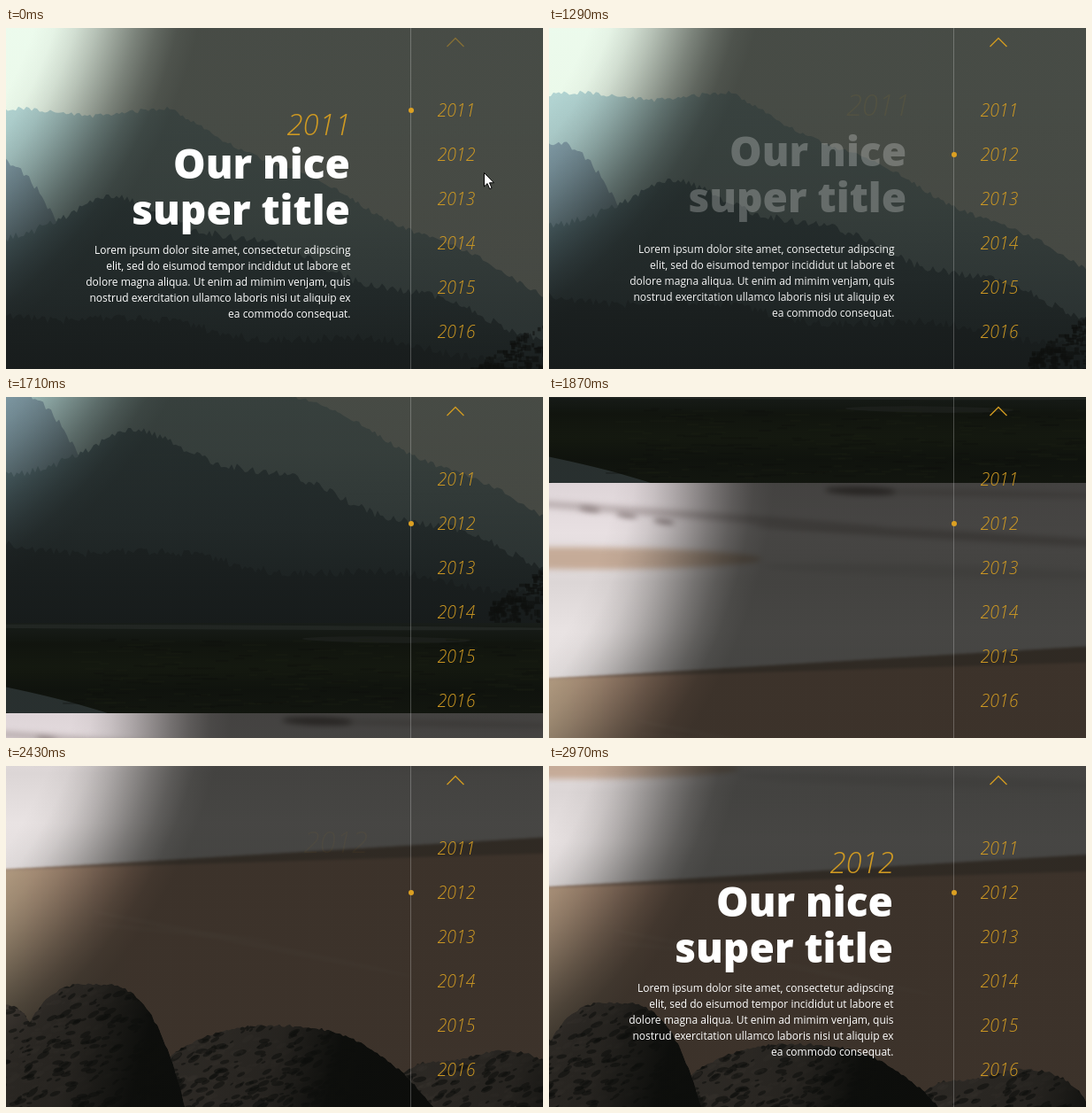
These frames come from a looping animation (607 px wide and 385 px high, 3220 ms). An HTML page with a canvas:

```html
<!DOCTYPE html>
<html lang="en">
<head>
<meta charset="utf-8">
<title>Timeline slider</title>
<style>
html, body { margin: 0; width: 100%; height: 100%; overflow: hidden; background: #101412; }
canvas { display: block; }
</style>
</head>
<body>
<canvas id="stage" width="607" height="385"></canvas>
<script>
const W = 607, H = 385, LOOP = 3220;
const HOLD = 142.5;                     // the picture changes about seven times a second
const IMG_H = 593, PAD = 60, TOP = 104; // each slide is taller and wider than the stage
const LEFT = -PAD, RIGHT = W + PAD;
const GOLD = '#d09a22';
const ctx = document.getElementById('stage').getContext('2d');

const BODY = [
  'Lorem ipsum dolor site amet, consectetur adipscing',
  'elit, sed do eisumod tempor incididut ut labore et',
  'dolore magna aliqua. Ut enim ad mimim venjam, quis',
  'nostrud exercitation ullamco laboris nisi ut aliquip ex',
  'ea commodo consequat.'
];

function seeded(seed) {
  return () => {
    seed = (seed * 1664525 + 1013904223) >>> 0;
    return seed / 4294967296;
  };
}

// Cubic bezier (.25, .1, .25, 1)
function ease(u) {
  if (u <= 0) return 0;
  if (u >= 1) return 1;
  let lo = 0, hi = 1, s = 0.5;
  for (let i = 0; i < 24; i++) {
    s = (lo + hi) / 2;
    if (0.75 * s * (1 - s) + s * s * s < u) lo = s; else hi = s;
  }
  return 0.3 * s * (1 - s) * (1 - s) + 3 * s * s * (1 - s) + s * s * s;
}
const tween = (t, start, length) => ease((t - start) / length);

/* ---------- Scenery ---------- */

function blend(grad, colors) {
  colors.forEach((c, i) => grad.addColorStop(i / (colors.length - 1), c));
  return grad;
}
const vertical = (g, y0, y1, ...colors) => blend(g.createLinearGradient(0, y0, 0, y1), colors);
const across = (g, x0, x1, ...colors) => blend(g.createLinearGradient(x0, 0, x1, 0), colors);

// Dark veil that clears towards the upper left.
function veil(g) {
  const inner = 410, outer = 590, alphas = [];
  for (let u = 0; u <= 1; u += 0.125) alphas.push(0.75 * u * u * (3 - 2 * u));
  g.fillStyle = blend(g.createRadialGradient(-334, -43, inner, -334, -43, outer),
    alphas.map(a => `rgba(16,17,14,${a})`));
  g.fillRect(LEFT, 0, RIGHT - LEFT, IMG_H);
}

function makeSlide(paint) {
  const c = document.createElement('canvas');
  c.width = RIGHT - LEFT;
  c.height = IMG_H;
  const g = c.getContext('2d');
  g.translate(PAD, 0);
  paint(g);
  veil(g);
  return c;
}

// Area below a rough line; line(x) is measured in the resting view.
function below(line, rough, seed) {
  const rnd = seeded(seed), path = new Path2D();
  path.moveTo(LEFT, IMG_H);
  for (let x = LEFT; x <= RIGHT; x += 3) path.lineTo(x, TOP + line(x) + (rnd() - 0.5) * rough);
  path.lineTo(RIGHT, IMG_H);
  path.closePath();
  return path;
}

function fill(g, path, style) {
  g.fillStyle = style;
  g.fill(path);
}

// Slanted streak with pointed ends.
function streak(g, style, x, y, length, drop, thick) {
  g.fillStyle = style;
  g.beginPath();
  g.ellipse(x, y, length / 2, thick / 2, Math.atan2(drop, length), 0, Math.PI * 2);
  g.fill();
}

const hills = makeSlide(g => {
  const rnd = seeded(5);
  g.fillStyle = vertical(g, 0, 380, '#edfcef', '#ebf9ea', '#e6eee0');
  g.fillRect(LEFT, 0, RIGHT - LEFT, IMG_H);

  const far = below(x => 74 + 0.48 * Math.max(0, x - 210) + 4 * Math.sin(x / 27 - 3), 5, 11);
  const spur = below(x => 126 + 0.014 * (x - 10) ** 2, 8, 23);
  const near = below(x => 172 + 0.32 * Math.abs(x - 150) + 6 * Math.sin(x / 30), 9, 37);
  const front = below(x => 296 + 0.09 * x + 6 * Math.sin(x / 40), 10, 51);
  fill(g, far, vertical(g, 174, 420, '#b2d4d2', '#a6c4c2', '#7f9aa0'));
  fill(g, spur, vertical(g, 230, 400, '#829da8', '#6f8992'));
  fill(g, near, vertical(g, 275, 489, '#64838a', '#566f78', '#35464e'));
  fill(g, front, 'rgba(36,48,56,.45)');

  // Bush in the right corner
  g.fillStyle = 'rgba(8,10,12,.6)';
  for (let i = 0; i < 230; i++) {
    const u = rnd();
    g.fillRect(545 + u * 110, TOP + H - rnd() * (20 + 75 * u), 2 + rnd() * 6, 2 + rnd() * 5);
  }

  // Meadow and stream below the trees
  g.fillStyle = vertical(g, 489, IMG_H, '#33433f', '#141f10', '#202e14', '#0e180c', '#182312');
  g.fillRect(LEFT, 491, RIGHT - LEFT, IMG_H);
  streak(g, '#55645f', 250, 496, 800, 4, 5);
  streak(g, '#3c4640', 430, 510, 190, 2, 7);
  streak(g, '#718b91', 10, 580, 280, 60, 28);
  for (let i = 0; i < 260; i++) {
    g.fillStyle = i % 2 ? 'rgba(60,76,32,.25)' : 'rgba(0,4,0,.3)';
    g.fillRect(60 + rnd() * 590, 508 + rnd() * 78, 8 + rnd() * 22, 2);
  }
});

// Boulder lit from the upper left; flecks make it rough.
function boulder(g, line, x0, x1, y0, seed) {
  const rnd = seeded(seed), span = x1 - x0;
  g.save();
  g.clip(below(line, 3, seed));
  const light = g.createLinearGradient(x0, y0, x0 + span * 0.95, y0 + span * 0.25);
  fill(g, below(line, 3, seed), blend(light, ['#82726a', '#7c6c64', '#665953', '#050606', '#020303']));
  for (let i = 0; i < 750; i++) {
    const u = rnd(), v = rnd(), s = 2 + rnd() * 6;
    const dark = rnd() < 0.45 + 0.3 * v;
    g.fillStyle = dark ? 'rgba(3,4,4,.55)' : `rgba(185,162,150,${0.4 * Math.max(0, 0.7 - u) * (1.2 - v)})`;
    g.beginPath();
    g.ellipse(x0 + u * span, y0 + v * 150, s, s * 0.4, -0.7 + rnd() * 0.6, 0, Math.PI * 2);
    g.fill();
  }
  g.restore();
}

const beach = makeSlide(g => {
  g.fillStyle = vertical(g, 0, 225, '#ded5d8', '#e8e0e2', '#dcd6d6', '#e9e3e3', '#e2dddd');
  g.fillRect(LEFT, 0, RIGHT - LEFT, IMG_H);

  g.filter = 'blur(3px)';
  streak(g, '#bcb1b2', 120, 33, 520, 38, 9);
  streak(g, '#b6abab', 470, 60, 480, 26, 10);
  streak(g, '#b9aeae', 500, 12, 330, 6, 6);
  streak(g, '#6a5d5e', 352, 9, 80, 2, 9);
  for (let x = 46; x < 140; x += 42) streak(g, '#857878', x, 22 + x / 6, 24, 3, 5);
  streak(g, '#c5ab98', 30, 85, 420, 2, 25);
  streak(g, '#cdc7c7', 450, 100, 420, 12, 14);

  g.filter = 'blur(1.5px)';
  fill(g, below(x => 117 - 0.06 * x, 0, 1), '#8d7464');
  fill(g, below(x => 117 - 0.03 * x, 0, 1), across(g, 0, 140, '#b09a80', '#c0967f'));
  streak(g, 'rgba(212,180,156,.3)', 280, 305, 370, 75, 7);
  streak(g, 'rgba(212,180,156,.25)', 200, 292, 200, 18, 6);
  g.filter = 'none';

  const dome = (cx, top, half, power) => x => top + 42 * Math.abs((x - cx) / half) ** power;
  const big = dome(98, 246, 70, 3), small = dome(0, 269, 40, 2);
  boulder(g, x => dome(540, 321, 100, 6)(x) + 6 + 6 * Math.sin(x / 23 - 1), 420, 740, 422, 97);
  boulder(g, dome(305, 293, 130, 2.5), 180, 450, 392, 83);
  boulder(g, x => Math.min(big(x), small(x)), LEFT, 250, 348, 71);
});

/* ---------- Interface ---------- */

function text(str, x, y, font, color, align) {
  ctx.font = font + ' "Open Sans", sans-serif';
  ctx.fillStyle = color;
  ctx.textAlign = align;
  ctx.fillText(str, x, y);
}

// Draws a group that fades towards the upper right.
function group(away, rise, draw) {
  if (away >= 0.995) return;
  ctx.save();
  ctx.globalAlpha = 1 - away;
  ctx.translate(20 * away, -rise * away);
  draw();
  ctx.restore();
}

function caption(t) {
  const entering = t >= 2000;
  const away = (out, outLen, back) =>
    entering ? 1 - tween(t, back, 410) : tween(t, out, outLen);

  group(away(1020, 400, 2395), 24, () =>
    text(entering ? '2012' : '2011', 390, 121, 'italic 300 33px', GOLD, 'right'));
  group(away(1100, 400, 2480), 18, () => {
    text('Our nice', 389, 170, '800 46px', '#fff', 'right');
    text('super title', 389, 222, '800 46px', '#fff', 'right');
  });
  group(away(1250, 500, 2560), 17, () =>
    BODY.forEach((line, i) => text(line, 389.5, 255 + 18 * i, '400 12px', '#fff', 'right')));
}

function nav(t) {
  const second = t >= 990;
  ctx.fillStyle = 'rgba(255,255,255,.24)';
  ctx.fillRect(457, 0, 1, H);

  ctx.strokeStyle = GOLD;
  ctx.lineWidth = 1.4;
  ctx.globalAlpha = second ? 1 : 0.45;
  ctx.beginPath();
  ctx.moveTo(498.5, 21);
  ctx.lineTo(508, 11.5);
  ctx.lineTo(517.5, 21);
  ctx.stroke();
  ctx.globalAlpha = 1;

  ctx.fillStyle = '#dca022';
  ctx.beginPath();
  ctx.arc(458, second ? 143 : 93, 3, 0, Math.PI * 2);
  ctx.fill();

  for (let i = 0; i < 6; i++) text(2011 + i, 487.5, 100 + 50 * i, 'italic 300 19.5px', GOLD, 'left');
}

const ARROW = new Path2D('M.5 .5V16l3.6-3.4 2.6 6 2.4-1-2.6-5.8h5z');
const HAND = new Path2D('M4.5 1.8Q5.9 .2 7.3 1.8V8Q9 7 10 8.4Q11.8 7.6 12.8 9.2Q14.6 8.6 15.8 10.4V15' +
  'L14.2 18.4V21.5H6.2V19L1.2 13Q.3 11.3 1.8 10.8L4.5 13z');
const KNUCKLES = new Path2D('M7.3 8v4M10 8.6v3.4M12.8 9.4V12');

function pointer(t) {
  if (t >= 1200) return;
  const hand = t >= 560, k = t / HOLD;
  const shape = hand ? HAND : ARROW;
  ctx.save();
  if (t >= 990) ctx.translate(516, 152);
  else if (hand) ctx.translate(514, 149);
  else ctx.translate(Math.round(540 - 6.5 * k), Math.round(163 - 0.15 * k ** 3));
  ctx.fillStyle = '#fff';
  ctx.strokeStyle = '#000';
  ctx.lineWidth = 1;
  ctx.fill(shape);
  ctx.stroke(shape);
  if (hand) ctx.stroke(KNUCKLES);
  ctx.restore();
}

function draw(t) {
  const shift = t < 2000 ? 1 - tween(t, 1030, 450) : tween(t, 2420, 270);
  const x = LEFT - Math.round(25 * shift);
  const y = Math.round(-TOP + 21 * shift - IMG_H * tween(t, 1600, 655));
  ctx.drawImage(hills, x, y);
  ctx.drawImage(beach, x, y + IMG_H);
  caption(t);
  nav(t);
  pointer(t);
}

const start = performance.now();
function tick() {
  const now = (performance.now() - start) % LOOP;
  draw(Math.floor((now + 23) / HOLD) * HOLD);
  requestAnimationFrame(tick);
}
tick();
</script>
</body>
</html>
```
